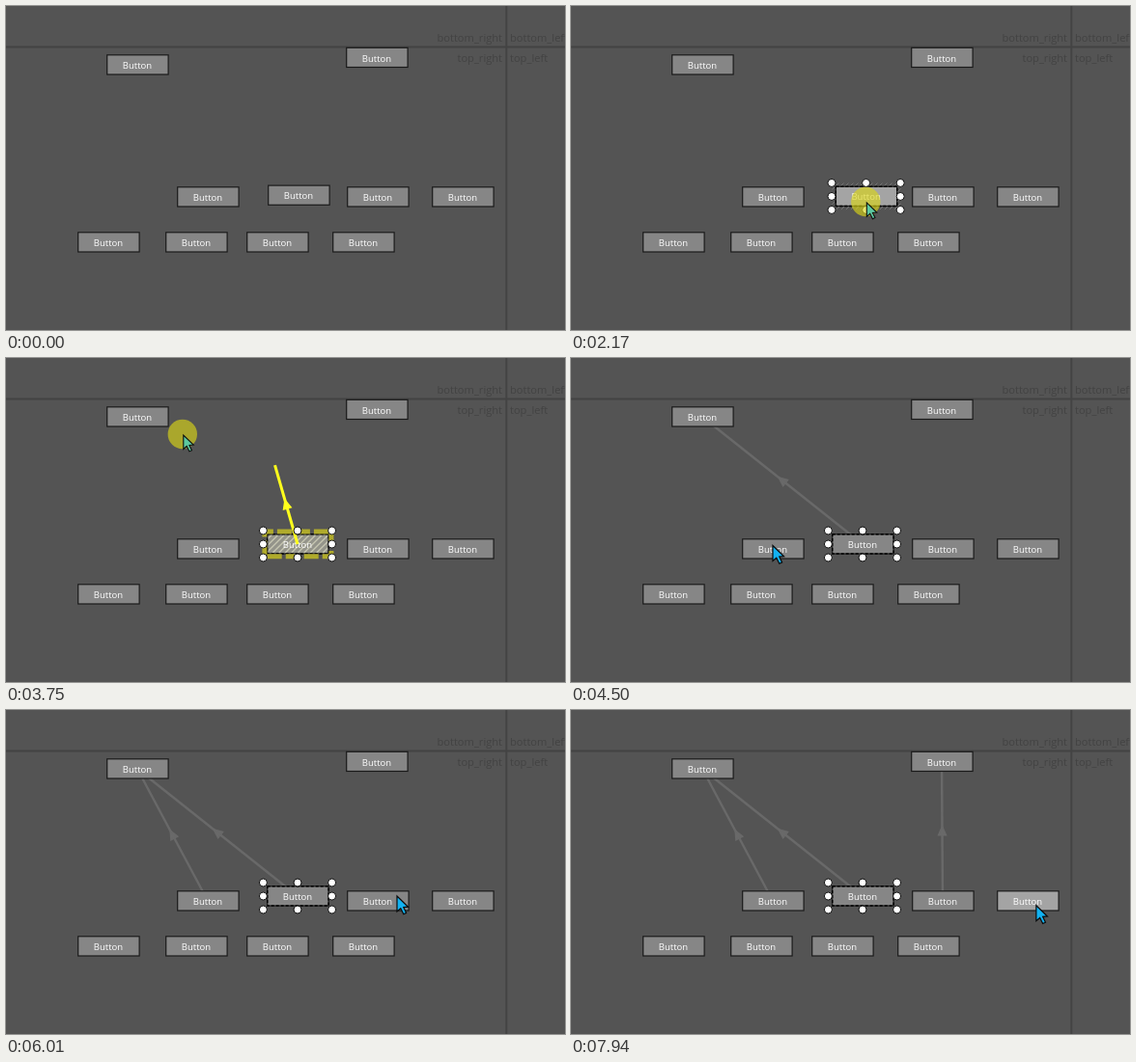
Animation, 579 px wide and 336 px high, one loop 8 s. Source, as an HTML page with a canvas:

```html
<!DOCTYPE html>
<html lang="en">
<head>
<meta charset="utf-8">
<title>Connecting buttons</title>
<style>
html, body { margin: 0; width: 100%; height: 100%; overflow: hidden; background: #545454; }
canvas { display: block; }
</style>
</head>
<body>
<canvas id="stage" width="579" height="336"></canvas>
<script>
const ctx = document.getElementById('stage').getContext('2d');
const LOOP = 8000, STEP = 68.4;
const W = 63.4, H = 20.2;
const GRAB = { x: 0.7, y: 6.5 };
const MOVED = 3;

const point = (x, y) => ({ x, y });
const row = (y, ...xs) => xs.map(x => point(x, y));
const buttons = [
  ...row(61, 136), ...row(53.5, 384),
  ...row(198, 209, 303, 385, 473),
  ...row(245, 106, 197, 281, 370)
];
buttons[MOVED].y -= 1.7;

const near = (i, dx, dy) => point(buttons[i].x + dx, buttons[i].y + dy);
const low = point(333, 237), rest = point(302.7, 199.5);
const entry = point(444, 301);

// Eased pointer strokes, resting in between; "via" bends a stroke
const strokes = [
  { start: 130, end: 620, to: near(MOVED, 1, 7) },
  { start: 890, end: 1130, to: low },
  { start: 1160, end: 1360, to: point(259.2, 169.5) },
  { start: 1430, end: 1800, to: low },
  { start: 1970, end: 2240, to: rest },
  { start: 2850, end: 3322, to: point(174, 107), via: point(238, 186) },
  { start: 3322, end: 3500, to: near(5, 15, -18), via: point(300, 80) },
  { start: 3500, end: 3830, to: near(0, 2, 4) },
  { start: 3980, end: 4300, to: near(2, 0, -3.5) },
  { start: 4700, end: 4900, to: point(262, 229) },
  { start: 4900, end: 5330, to: near(0, 2, 4) },
  { start: 5740, end: 6012, to: near(4, 20, -5) },
  { start: 6100, end: 6400, to: near(4, 1, 1) },
  { start: 6570, end: 7100, to: near(1, 1, -3) },
  { start: 7390, end: 7940, to: near(5, 9, 5) }
];

const links = [
  { from: 3, to: 0, press: 2720, over: 3760, release: 3980 },
  { from: 2, to: 0, press: 4700, over: 5260, release: 5740 },
  { from: 4, to: 1, press: 6430, over: 6960, release: 7390 }
];
const hovers = [
  { id: 3, from: 550, to: 2720 }, { id: 2, from: 4580, to: 4700 },
  { id: 4, from: 6250, to: 6430 }, { id: 5, from: 7850, to: LOOP }
];
const drag = { press: 890, release: 2440 };

const within = (t, a, b) => t >= a && t < b;
const ease = u => u * u * (3 - 2 * u);
const mix = (a, b, k) => point(a.x + (b.x - a.x) * k, a.y + (b.y - a.y) * k);

function pointer(t) {
  let at = entry;
  for (const { start, end, to, via } of strokes) {
    if (t < start) break;
    const k = ease(Math.min(1, (t - start) / (end - start)));
    at = via ? mix(mix(at, via, k), mix(via, to, k), k) : mix(at, to, k);
  }
  return at;
}

function center(i, t) {
  if (i !== MOVED || t < drag.press) return buttons[i];
  const p = pointer(Math.min(t, drag.release));
  return point(p.x - GRAB.x, p.y - GRAB.y);
}

// Box around a button, grown by a margin
function box(i, t, grow) {
  const c = center(i, t);
  return [c.x + 0.4 - W / 2 - grow, c.y - 0.1 - H / 2 - grow, W + 2 * grow, H + 2 * grow];
}

function label(text, x, y, size, color, align) {
  ctx.font = size + 'px "Open Sans", "Noto Sans", sans-serif';
  ctx.fillStyle = color;
  ctx.textAlign = align;
  ctx.fillText(text, x, y);
}

function line(a, b, color, width) {
  ctx.strokeStyle = color;
  ctx.lineWidth = width;
  ctx.beginPath();
  ctx.moveTo(a.x, a.y);
  ctx.lineTo(b.x, b.y);
  ctx.stroke();
}

function disc(x, y, r, fill) {
  ctx.beginPath();
  ctx.arc(x, y, r, 0, Math.PI * 2);
  ctx.fillStyle = fill;
  ctx.fill();
}

function dashedBox(rect, color, width, dash, offset) {
  ctx.save();
  ctx.setLineDash(dash);
  ctx.lineDashOffset = offset;
  ctx.lineJoin = 'round';
  ctx.strokeStyle = color;
  ctx.lineWidth = width;
  ctx.strokeRect(...rect);
  ctx.restore();
}

function hatch([x, y, w, h], gap, color, width) {
  ctx.save();
  ctx.beginPath();
  ctx.rect(x, y, w, h);
  ctx.clip();
  for (let d = gap / 2; d < w + h; d += gap) {
    line(point(x + d, y), point(x + d - h, y + h), color, width);
  }
  ctx.restore();
}

function backdrop() {
  const ink = '#434343';
  ctx.fillStyle = '#545454';
  ctx.fillRect(0, 0, 579, 336);
  line(point(0, 42.5), point(579, 42.5), ink, 2);
  line(point(518.3, 0), point(518.3, 336), ink, 2);
  ['bottom', 'top'].forEach((side, i) => {
    label(side + '_right', 514, 37 + 21 * i, 11.1, ink, 'right');
    label(side + '_left', 522, 37 + 21 * i, 11.1, ink, 'left');
  });
}

function arrow(a, b, color, width, hollow) {
  line(a, b, color, width);
  const mid = mix(a, b, 0.5);
  ctx.save();
  ctx.translate(mid.x, mid.y);
  ctx.rotate(Math.atan2(b.y - a.y, b.x - a.x));
  ctx.beginPath();
  ctx.moveTo(5, 0);
  ctx.lineTo(-4, -4);
  ctx.lineTo(-4, 4);
  ctx.closePath();
  ctx.fillStyle = hollow ? '#777' : color;
  ctx.fill();
  ctx.lineWidth = 1.4;
  ctx.stroke();
  ctx.restore();
}

function button(i, t) {
  const rect = box(i, t, 0);
  const lit = hovers.some(h => h.id === i && within(t, h.from, h.to));
  ctx.fillStyle = lit ? '#a4a4a4' : '#868686';
  ctx.fillRect(...rect);
  ctx.strokeStyle = '#1a1a1a';
  ctx.lineWidth = 1.2;
  ctx.strokeRect(...rect);
  if (i === MOVED && t >= drag.press) dashedBox(rect, '#000', 1.4, [3, 2], 0);
}

function highlight(i, t, color, fill, stripes) {
  const inner = box(i, t, -1);
  ctx.fillStyle = fill;
  ctx.fillRect(...inner);
  hatch(inner, 6.5, stripes, 1.3);
  dashedBox(box(i, t, 2.8), color, 5, [15, 4], 6);
}

function grip(t) {
  const rect = box(MOVED, t, 4);
  ctx.save();
  ctx.beginPath();
  ctx.rect(...rect);
  ctx.rect(...box(MOVED, t, 0));
  ctx.clip('evenodd');
  hatch(rect, 5, '#777', 1);
  ctx.restore();
}

function handles(t) {
  const { x, y } = center(MOVED, t);
  for (let i = -1; i <= 1; i++) for (let j = -1; j <= 1; j++) {
    if (!i && !j) continue;
    disc(x + i * 35.6, y + j * 14, 4, '#fff');
    ctx.strokeStyle = '#111';
    ctx.lineWidth = 1;
    ctx.stroke();
  }
}

function cursor(t, pressed) {
  const { x, y } = pointer(t);
  ctx.save();
  ctx.translate(x, y);
  if (pressed) {
    disc(-1, -1, 15.2, 'rgba(220,215,20,0.63)');
    ctx.scale(0.9, 0.9);
  }
  ctx.fillStyle = pressed ? '#5cc8a0' : '#12b2f2';
  ctx.strokeStyle = '#0c0c0c';
  ctx.lineWidth = 1.2;
  const shape = new Path2D('M0 0V16L3.8 12.7L6.8 18.7L9.6 17.4L6.8 11.6L11.6 11.2Z');
  ctx.fill(shape);
  ctx.stroke(shape);
  ctx.restore();
}

function draw(time) {
  // The picture advances in even steps
  const t = time < 130 ? 0 : 130 + Math.floor((time - 115) / STEP) * STEP;
  const active = links.find(l => within(t, l.press, l.release));
  const over = active && t >= active.over;
  const selected = t >= drag.press;
  const dragging = within(t, drag.press, drag.release);

  backdrop();
  for (const l of links) {
    if (t >= l.release) arrow(center(l.from, t), center(l.to, t), '#696969', 2.4);
  }
  buttons.forEach((_, i) => { if (i !== MOVED) button(i, t); });
  if (dragging) grip(t);
  button(MOVED, t);
  if (active) highlight(active.from, t, '#b0ab2c', '#94948a', '#c6c6b2');
  if (over) highlight(active.to, t, '#fff', '#707070', '#e0e0e0');
  buttons.forEach((_, i) => {
    const c = center(i, t);
    label('Button', c.x, c.y + 4, 9.5, '#fff', 'center');
  });
  if (active) {
    const end = over ? center(active.to, t) : pointer(Math.max(active.press, t - STEP));
    arrow(center(active.from, t), end, over ? '#fff' : '#ffff1c', over ? 2.4 : 3, over);
  }
  if (selected) handles(t);
  if (t >= 130) cursor(t, active || dragging);
}

const start = performance.now();
function tick() {
  draw((performance.now() - start) % LOOP);
  requestAnimationFrame(tick);
}
tick();
</script>
</body>
</html>
```
